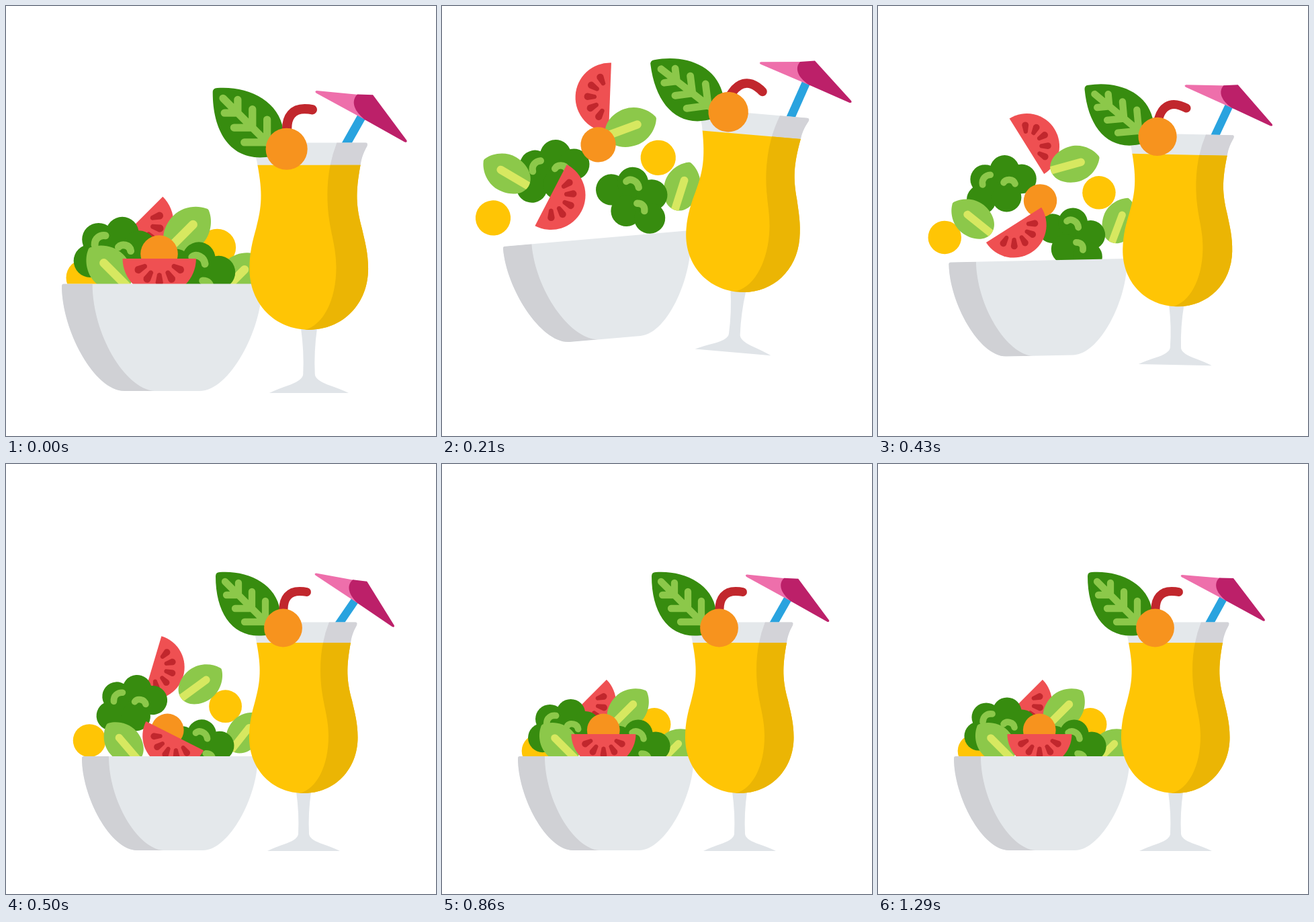
An HTML page with a canvas that plays this animation: 640x640 px, repeating every 1.93 s.

```html
<!DOCTYPE html>
<html lang="en">
<head>
<meta charset="utf-8">
<title>Salad and juice</title>
<style>
html, body { margin: 0; height: 100%; overflow: hidden; background: #fff; }
canvas { display: block; width: 100vw; height: 100vh; }
</style>
</head>
<body>
<canvas id="stage" width="640" height="640"></canvas>
<script>
const ctx = document.getElementById('stage').getContext('2d');
const LOOP = 1930, FPS = 14, LAST_STEP = 18, LANDED = 7;
const GREEN = '#378c0f', LIME = '#8cc84a', VEIN = '#d7e860', RED = '#ef5052', CRIMSON = '#c1272d',
  ORANGE = '#f7931e', YELLOW = '#ffc505', SILVER = '#e4e8eb', STEM = '#e0e4e8',
  BLUE = '#29a3df', PINK = '#ee6fab', MAGENTA = '#bc2069';

// ---- drawing helpers
function fill(color, d) {
  ctx.fillStyle = color;
  ctx.fill(new Path2D(d));
}
function line(color, width, d, cap = 'round') {
  ctx.strokeStyle = color;
  ctx.lineWidth = width;
  ctx.lineCap = cap;
  ctx.lineJoin = 'round';
  ctx.stroke(new Path2D(d));
}
function disc(color, x, y, r) {
  ctx.fillStyle = color;
  ctx.beginPath();
  ctx.arc(x, y, r, 0, 7);
  ctx.fill();
}
function placed(x, y, deg, scale, draw, pivotX = 0, pivotY = 0) {
  ctx.save();
  ctx.translate(x, y);
  ctx.rotate(deg * Math.PI / 180);
  ctx.scale(scale, scale);
  ctx.translate(-pivotX, -pivotY);
  draw();
  ctx.restore();
}
function shaded(color, shadeColor, shape, shade) {
  fill(color, shape);
  ctx.save();
  ctx.clip(new Path2D(shape));
  fill(shadeColor, shade);
  ctx.restore();
}

// ---- timing curves, all functions of the step number
const clamp = u => Math.max(0, Math.min(1, u));
const smooth = u => u * u * (3 - 2 * u);
function keys(step, ...points) {
  const next = points.findIndex(([at]) => at > step);
  if (next < 0) return points[points.length - 1][1];
  const [from, a] = points[next - 1], [to, b] = points[next];
  return a + (b - a) * smooth((step - from) / (to - from));
}
const hop = s => s < 4 ? (1 - Math.cos(Math.PI * s / 4)) / 2 : 1 - clamp((s - 4) / 3) ** 2.2;
const tilt = s => s < 3 ? smooth(s / 3) : clamp((LANDED - s) / 4);
const swell = s => clamp(1 - s / LANDED) ** 1.2;

// Tosses give [distance, turn] as parts of a piece's full flight
const stay = (s, land) => 1 - smooth(clamp((s - 5) / (land - 5)));
const fly = (s, land) => (1 - clamp(1 - s / 5) ** 3) * stay(s, land);
const early = s => [fly(s, LANDED), keys(s, [0, 0], [5, 1], [LANDED, -.3], [9, 0])];
const late = s => [fly(s, 8.7), smooth(clamp(s / 5)) * stay(s, 8.7) ** 2];
const tumble = s => [fly(s, 8.7), clamp(s / 7.6)];
const bounce = s => {
  const p = keys(s, [0, 0], [5, 1], [9, -.2], [13, 0]);
  return [p, clamp(p) ** 1.1];
};

// ---- salad, drawn around each piece's centre
function tomato() {
  ctx.translate(0, -24);
  fill(RED, 'M-48 0H48A48 48 0 0 1-48 0Z');
  for (let a = -62; a <= 62; a += 31) {
    placed(0, 0, a, 1, () =>
      fill(CRIMSON, 'M-2.8 20L-4.9 31A4.9 4.9 0 0 0 4.9 31L2.8 20Q0 17-2.8 20Z'));
  }
}
const leaf = size => () => {
  const shape = 'M-37 0C-37-16-19-26.5-1-26.5C17-26.5 31-14 36-3Q38 0 36 3C31 14 17 26.5-1 26.5C-19 26.5-37 16-37 0Z';
  ctx.scale(size, size);
  fill(LIME, shape);
  ctx.clip(new Path2D(shape));
  line(VEIN, 11.6, 'M-45 0H9');
};
const broccoli = (lobes, shine) => () => {
  disc(GREEN, 0, 0, 21);
  lobes.forEach(([x, y]) => disc(GREEN, x, y, 21.6));
  line(LIME, 9.6, shine);
};
const leftBroccoli = broccoli([[-21, -18], [10, -26], [-32, 10], [32, -8], [5, 14]],
  'M-26-11C-26-20-19-24-12-23M5-8C9-13 20-11 21-3');
const rightBroccoli = broccoli([[-28, -15], [2, -24], [28, -6], [-8, 15], [24, 26]],
  'M-7-26C-1-31 9-26 10-17M7 5C14 5 18 9 17 16');
const ball = color => () => disc(color, 0, 0, 24.4);

// Resting place and flight, measured from the middle of the bowl's foot
function piece(step, draw, toss, [x, y, deg], [dx, dy, spin]) {
  const [far, turn] = toss(step);
  placed(x + dx * far, y + dy * far, deg + spin * turn, 1, draw);
}
function salad(step) {
  piece(step, tomato, tumble, [-15.8, -203, -45], [29, -143, 360]);
  piece(step, ball(YELLOW), late, [-100.7, -148, 0], [-43, -35, 0]);
  piece(step, ball(YELLOW), late, [72.3, -187.5, 0], [24, -61, 0]);
  piece(step, leaf(1), late, [34.3, -211, -45], [28.5, -85, 45.8]);
  piece(step, leaf(.94), late, [102, -152.7, -45], [24.5, -53, -34.7]);
  piece(step, leftBroccoli, bounce, [-61.7, -180, 0], [13, -82, -12.7]);
  piece(step, rightBroccoli, early, [46.3, -149, 0], [7.5, -43, 5]);
  piece(step, leaf(.975), early, [-69.7, -161, 225], [-51, -86, -14.7]);
  piece(step, ball(ORANGE), early, [-3.5, -179, 0], [18, -97, 0]);
  piece(step, tomato, early, [-3.3, -149, 0], [-37, -46.5, -89]);
}

function bowl() {
  shaded(SILVER, '#d0d1d5',
    'M113 438Q113 435 116 435H371.5Q374.5 435 374.5 438C374.5 495 332 575 293 575H195C155 575 113 495 113 438Z',
    'M100 435H153C153 500 195 572 234 575H100Z');
}

// ---- glass, in resting stage coordinates
function umbrella() {
  line(BLUE, 12, 'M515 198L478 265', 'butt');
  fill(PINK, 'M452.5 165L512 170L520 204.5L452 168.3Q449 166 452.5 165Z');
  fill(MAGENTA, 'M508 169.5L529 170L575.5 231Q577 234.5 573 233.6L518 203.5C501 190 500 177 508 169.5Z');
}
function cup() {
  const shade = 'M481 235Q468 268 468 306C468 352 480 370 480 405C480 450 462 484 437 490L530 492V235Z';
  fill(STEM, 'M389 576Q399 571 418 564.5Q435 558 435 550Q436.5 520 432 488H454Q449.5 520 451 550Q451 558 468 564.5Q487 571 497 576Z');
  shaded(SILVER, '#d3d3d8',
    'M366 235.5H520Q523.5 235.5 522 240C516 251 514 258 513 266.5H373C372 258 370 251 364 240Q362.5 235.5 366 235.5Z', shade);
  shaded(YELLOW, '#ebb504',
    'M373 266C380 304 379 322 371 352C366 370 362 385 362 407C362 455 397 490 443 490C489 490 523.5 455 523.5 407C523.5 385 519 370 515 352C507 322 506 304 513 266Z', shade);
}
function sprig() {
  fill(GREEN, 'M312 167Q312 161 318 161C360 158 402 178 408 218L412 244L392 254C340 264 312 225 312 167Z');
  line(LIME, 10.3, 'M326 175L388 237M346 177V195H328M366 190V215H341M386 204V235H355');
}
function straw() {
  line(CRIMSON, 13, 'M413 234V216C413 200 421 189.5 437 189.5Q443 189.5 447.5 190.5');
}
function drink(step) {
  const loose = fly(step, LANDED);
  const sway = keys(step, [0, .6], [5, -15.5], [LANDED, 5.5], [10, 0], [14, 1.6], [18, 0]);
  placed(483 + 11 * loose, 258 - 10.5 * loose, sway, 1, umbrella, 483, 258);
  cup();
  placed(358, 269, -13 * loose, 1, sprig, 358, 269);
  placed(426, 207.6, 32 * loose, 1, straw, 426, 207.6);
  disc(ORANGE, 412.5 - 5.5 * loose, 244 - 8 * loose, 28.4);
}

function render(now) {
  const step = Math.min(LAST_STEP, Math.floor((now % LOOP + 5) * FPS / 1000));
  const up = hop(step), lean = tilt(step), grow = swell(step);
  const bowlX = keys(step, [0, 232], [3, 243], [5, 238], [LANDED, 243.75]);
  const glassX = keys(step, [0, 451], [3, 433], [5, 441.7], [LANDED, 443]);

  ctx.fillStyle = '#fff';
  ctx.fillRect(0, 0, 640, 640);
  placed(bowlX, 575 - 92 * up - 2 * grow, -4.9 * lean, 1 + .139 * grow, () => {
    salad(step);
    ctx.translate(-243.75, -575);
    bowl();
  });
  placed(glassX, 576 - 71 * up, 4.9 * lean, 1 + .094 * grow, () => drink(step), 443, 576);
}

const begin = performance.now();
function tick() {
  render(performance.now() - begin);
  requestAnimationFrame(tick);
}
tick();
</script>
</body>
</html>
```
